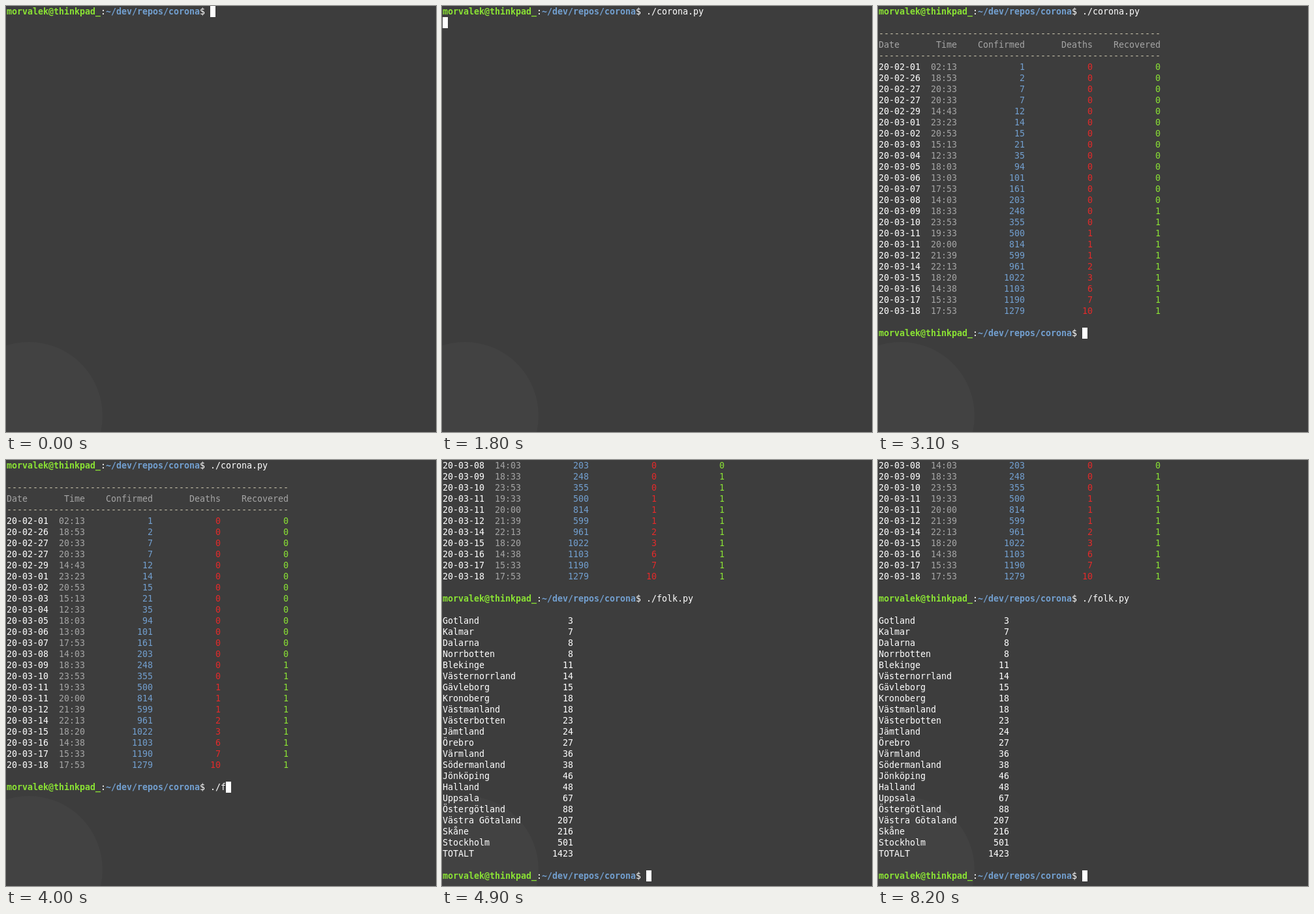
Animation of 659x653 px, one loop 8600 ms. Source, as an HTML page:

```html
<!DOCTYPE html>
<html lang="en">
<head>
<meta charset="utf-8">
<title>Terminal</title>
<style>
  html, body { margin: 0; width: 100%; height: 100%; overflow: hidden; background: #3d3d3d; }
  body { position: relative; }
  #disc { position: absolute; left: -78px; top: 515px; width: 226px; height: 226px; border-radius: 50%; background: #424242; }
  #term {
    position: absolute; left: 1px; top: 0; margin: 0; color: #fff;
    font: 10pt/17px "DejaVu Sans Mono", monospace;
    letter-spacing: calc(8px - 1ch); /* whole-pixel cells */
    white-space: pre;
  }
  #cursor { position: absolute; width: 8px; height: 17px; background: #fff; }
  .user { color: #8ae234; font-weight: bold; }
  .path { color: #729fcf; font-weight: bold; }
  .dim { color: #a5a5a5; }
  .rule { color: #c4bfa8; }
  .blue { color: #729fcf; }
  .red { color: #e32a2a; }
  .green { color: #8ae234; }
</style>
</head>
<body>
<div id="disc"></div>
<pre id="term"></pre>
<div id="cursor"></div>
<script>
const LOOP = 8600, CELL = 8, LINE = 17, ROWS = 38, PROMPT = 39;

const span = (cls, text) => `<span class="${cls}">${text}</span>`;
const cell = (cls, text, width = 13) => span(cls, String(text).padStart(width));
const words = text => text.trim().split(/\s+/);
const days = (month, from, to = from) =>
  Array.from({ length: to - from + 1 }, (_, i) => `20-${month}-${String(from + i).padStart(2, '0')}`);

const prompt = cmd =>
  span('user', 'morvalek@thinkpad_') + ':' + span('path', '~/dev/repos/corona') + '$ ' + cmd;

function caseTable() {
  const dates = [
    ...days('02', 1), ...days('02', 26, 27), ...days('02', 27), ...days('02', 29),
    ...days('03', 1, 11), ...days('03', 11, 12), ...days('03', 14, 18)
  ];
  const times = words(`02:13 18:53 20:33 20:33 14:43 23:23 20:53 15:13 12:33 18:03 13:03 17:53
    14:03 18:33 23:53 19:33 20:00 21:39 22:13 18:20 14:38 15:33 17:53`);
  const confirmed = words(`1 2 7 7 12 14 15 21 35 94 101 161 203 248 355 500 814 599 961
    1022 1103 1190 1279`);
  const deaths = words('1 1 1 2 3 6 7 10');
  const firstDeath = dates.length - deaths.length;

  const rule = span('rule', '-'.repeat(54));
  const header = span('dim', 'Date' + 'Time'.padStart(11)) +
    ['Confirmed', 'Deaths', 'Recovered'].map(name => cell('dim', name)).join('');
  const rows = dates.map((date, i) => date + cell('dim', times[i], 7) +
    cell('blue', confirmed[i]) +
    cell('red', deaths[i - firstDeath] ?? 0) +
    cell('green', date < '20-03-09' ? 0 : 1));
  return ['', rule, header, rule, ...rows, ''];
}

function regionTable() {
  const regions = `Gotland 3,Kalmar 7,Dalarna 8,Norrbotten 8,Blekinge 11,Västernorrland 14,
    Gävleborg 15,Kronoberg 18,Västmanland 18,Västerbotten 23,Jämtland 24,Örebro 27,
    Värmland 36,Södermanland 38,Jönköping 46,Halland 48,Uppsala 67,Östergötland 88,
    Västra Götaland 207,Skåne 216,Stockholm 501`.split(/,\s*/).map(s => s.split(/ (?=\d)/));
  const total = regions.reduce((sum, [, count]) => sum + Number(count), 0);
  const rows = [...regions, ['TOTALT', String(total)]];
  return ['', ...rows.map(([name, count]) => name + count.padStart(25 - name.length)), ''];
}

// keys: keystroke times, the last one is Tab, which completes the command
const runs = [
  { cmd: './corona.py ', keys: [800, 1100, 1200, 1400, 1500], enter: 1800, done: 2100, out: caseTable() },
  { cmd: './folk.py ', keys: [3400, 3700, 4000, 4100, 4300], enter: 4600, done: 4900, out: regionTable() },
  { cmd: '', keys: [], enter: LOOP, done: LOOP, out: [] }
];
const blinks = [200, 800, 2400, 3100, 5200, 5800, 6400, 7000, 7500, 8200];

const term = document.getElementById('term');
const cursor = document.getElementById('cursor');
const passed = (times, t) => times.filter(x => x <= t).length;
let shown;

function draw(t) {
  const current = runs.findIndex(run => t < run.done);
  const { cmd, keys, enter } = runs[current];
  const pressed = passed(keys, t);
  const typed = pressed < keys.length ? pressed : cmd.length;
  const running = t >= enter;

  const lines = runs.slice(0, current).flatMap(run => [prompt(run.cmd), ...run.out]);
  lines.push(prompt(cmd.slice(0, typed)));
  if (running) lines.push('');
  const view = lines.slice(-ROWS);
  const html = view.join('\n');
  if (html !== shown) term.innerHTML = shown = html;

  cursor.style.left = 1 + CELL * (running ? 0 : PROMPT + typed) + 'px';
  cursor.style.top = LINE * (view.length - 1) + 'px';
  cursor.style.visibility = passed(blinks, t) % 2 ? 'hidden' : 'visible';
}

function tick() {
  draw(performance.now() % LOOP);
  requestAnimationFrame(tick);
}
tick();
</script>
</body>
</html>
```
